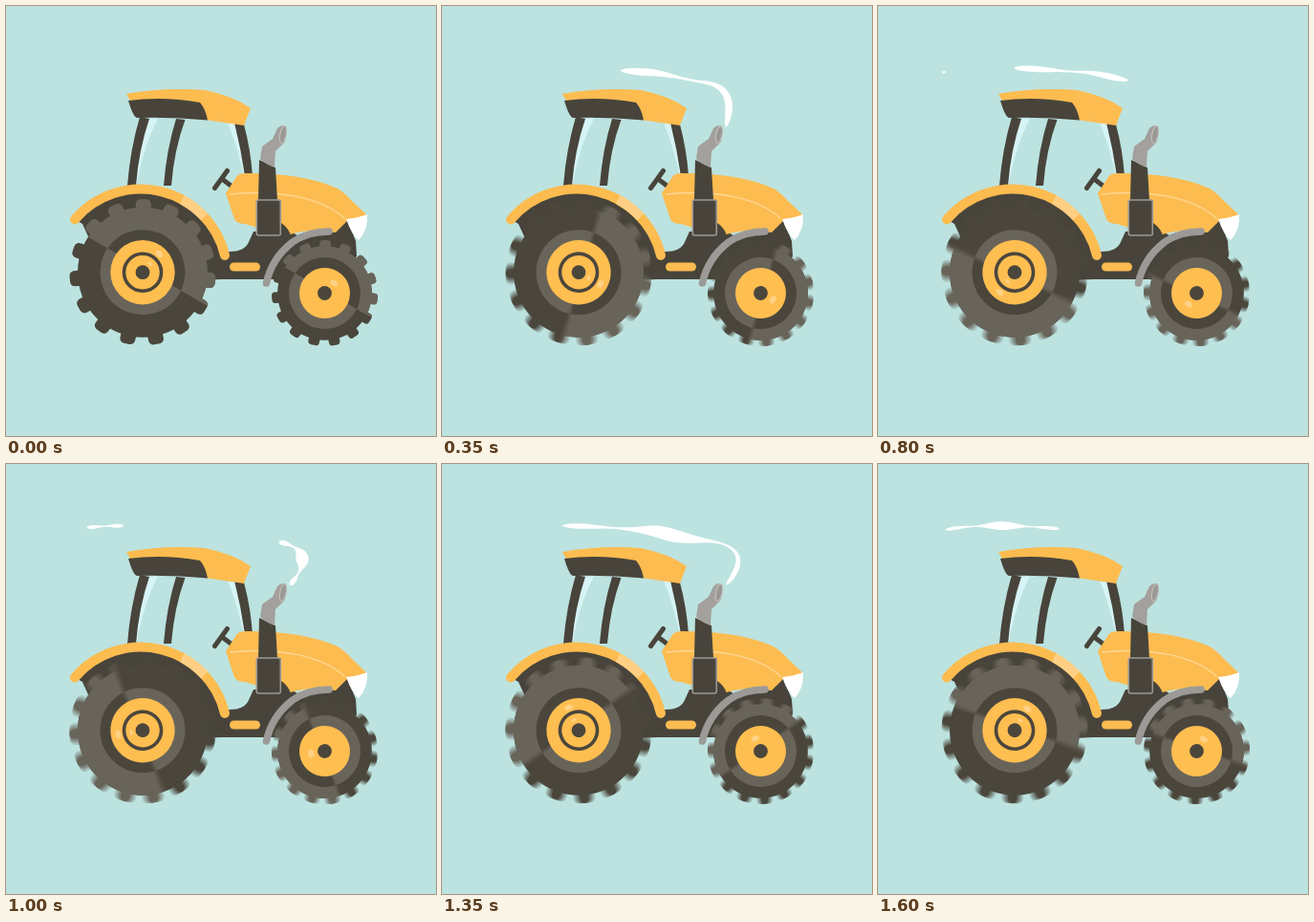
These frames come from a looping animation (450 by 450 pixels, 1650 ms). An HTML page:

```html
<!DOCTYPE html>
<html lang="en">
<head>
<meta charset="utf-8">
<title>Tractor</title>
<style>
  html, body { margin: 0; height: 100%; overflow: hidden; background: #bce3e0; }
  svg { display: block; width: 100vw; height: 100vh; }
  .blur { isolation: isolate; }
  .blur > g { mix-blend-mode: plus-lighter; }
  .dark { fill: #48443b; }
  .light { fill: #686257; }
  .yellow { fill: #fdbc50; }
  .shine { fill: #ffd084; }
  .line { fill: none; stroke-linecap: round; stroke-linejoin: round; }
</style>
</head>
<body>
<svg viewBox="0 0 450 450">
  <g id="smoke" fill="#fff"></g>

  <!-- cab -->
  <path fill="#d6f4f6" d="M148 118H159Q144 146 137 186H134ZM232 122H241L251 178H249Q243 150 232 122Z"/>
  <path class="dark" d="M140 116Q130 150 127 188H136Q139 150 150 118ZM178 118Q168 150 165 188H173Q176 150 187.5 119ZM239 122Q246 150 250 178H258Q256 150 249 124Z"/>
  <path class="yellow" d="M126 92Q165 85 208 88Q238 94 256 107L249 125L208 119L130 99Z"/>
  <path class="dark" d="M128 99Q165 94 203 101Q209 108 211 119.5Q175 116 137 117Q133 116 128 99Z"/>
  <path class="line" stroke="#48443b" stroke-width="5" d="M218.5 190.5L231.5 172.5M226 181L238 190"/>

  <!-- chassis and rear fender -->
  <path class="dark" d="M215 257H234Q250 257 254 247L259 236H298L310 243 345 236 356 221 366 246 367 262 340 300 285 286H215Z"/>
  <path class="dark" d="M80 228L72 223.5A90.5 90.5 0 0 1 229 260L225 286 143 290 90 250Z"/>
  <path class="line" stroke="#fdbc50" stroke-width="10" d="M72 223.5A90.5 90.5 0 0 1 229 261"/>
  <path fill="none" stroke="#ffd084" stroke-width="10" pathLength="100" stroke-dasharray="0 62 15 100" d="M72 223.5A90.5 90.5 0 0 1 229 261"/>
  <rect class="yellow" x="234" y="268.5" width="32" height="9" rx="4.5"/>

  <!-- bonnet and exhaust -->
  <path class="yellow" d="M230 196L241 179Q243 175 252 175Q312 175 347 191Q354 195 362 204L378 219L357 225Q350 232 345 237Q312 232 293 241L250 228Q241 228 239 223Z"/>
  <path class="line" stroke="#ffd793" stroke-width="1.4" d="M235 197C285 192 330 200 354 222"/>
  <path fill="#fff" d="M356 223Q368 222 378 218Q379 235 369 245Q362 240 356 223Z"/>
  <path class="dark" d="M265 161L282 169 284 203H288V227Q296 232 299 243L285 262H255L262 236V203H264Z"/>
  <rect class="line" x="262.3" y="203" width="25" height="37" rx="2" stroke="#9c9894" stroke-width="1.6"/>
  <path fill="#a3a09d" d="M266 160L268 147 279 139 284 128Q289 123 293 126L292 142 282 152 281 169Q272 166 266 160Z"/>
  <ellipse cx="290" cy="134.5" rx="3.2" ry="9" transform="rotate(12 290 134.5)" fill="#9a9794" stroke="#c1bfbc" stroke-width="1.2"/>

  <g id="wheels"></g>
  <path class="line" stroke="#9c9a97" stroke-width="7.5" d="M272.5 290Q278 264 300 247Q316 236 338 236"/>
</svg>
<script>
const LOOP = 1650, STEP = 50, COPIES = 5, SHUTTER = 5.5, TEETH = 15;
const smoke = document.getElementById('smoke');
const wheels = document.getElementById('wheels');

function add(parent, tag, attrs = {}) {
  const el = document.createElementNS('http://www.w3.org/2000/svg', tag);
  for (const name in attrs) el.setAttribute(name, attrs[name]);
  return parent.appendChild(el);
}

function tread(radius) {
  let shapes = '<circle r="68"/>';
  for (let i = 0; i < TEETH; i++)
    shapes += `<rect x="56" y="-8" width="20.5" height="16" rx="5" transform="rotate(${6.7 + i * 360 / TEETH})"/>`;
  return `<g transform="scale(${radius / 76.5})">${shapes}</g>`;
}

function wheelArt({ radius, ring, hub, shine, rim }, id) {
  const shape = tread(radius);
  return `<g class="dark">${shape}</g><circle r="${ring}" class="light"/>
    <g clip-path="url(#half${id})"><g class="light">${shape}</g><circle r="${ring}" class="dark"/></g>
    <circle r="${hub}" class="yellow"/>
    ${rim ? `<circle r="${rim}" fill="none" stroke="#48443b" stroke-width="3.6"/>` : ''}
    <circle r="7.4" class="dark"/>
    <g class="shine" transform="rotate(-48)">
      <ellipse cx="${shine}" rx="3" ry="4.2"/>${rim ? '<ellipse cx="12" rx="1.6" ry="2.8"/>' : ''}
    </g>`;
}

const copies = [];
[
  { x: 143, y: 278.7, radius: 76.5, ring: 44.5, hub: 33.7, shine: 26, rim: 19.5 },
  { x: 333.5, y: 300.5, radius: 55.5, ring: 37.5, hub: 26.5, shine: 14.5 }
].forEach((wheel, id) => {
  const clip = add(wheels, 'clipPath', { id: 'half' + id });
  add(clip, 'rect', { x: wheel.radius / 22, y: -90, width: 90, height: 180, transform: 'rotate(-60)' });
  const place = add(wheels, 'g', { class: 'blur', transform: `translate(${wheel.x} ${wheel.y})` });
  for (let i = 0; i < COPIES; i++) {
    const copy = add(place, 'g', { opacity: 1 / COPIES });
    copy.innerHTML = wheelArt(wheel, id);
    copies.push({ copy, offset: (i / (COPIES - 1) - 0.5) * SHUTTER });
  }
});

// Each puff leaves the pipe at `start`; its tail lets go after `hold` ms.
const puffs = [
  { start: 50, hold: 310, lobes: 1, bend: 303 },
  { start: 390, hold: 320, lobes: 1, bend: 305 },
  { start: 885, hold: 525, lobes: 2, bend: 317 }
];
for (const puff of puffs) {
  const d = `M297 127C${puff.bend} 104 ${puff.bend} 84 275 80S235 70 210 69S110 59 66 70`;
  puff.track = add(smoke, 'path', { d, fill: 'none' });
  puff.length = puff.track.getTotalLength();
  puff.body = add(smoke, 'path');
}

const easeOut = k => Math.sin(Math.PI / 2 * Math.min(1, Math.max(0, k)));

function outline({ start, hold, lobes, track, length }, t) {
  const head = easeOut((t - start) / 800), tail = easeOut((t - start - hold) / 500);
  if (head - tail < 0.005) return '';
  const size = 4 * (1 - 0.6 * tail), left = [], right = [];
  for (let i = 0; i <= 48; i++) {
    const u = i / 48, s = (tail + (head - tail) * u) * length;
    const p = track.getPointAtLength(s);
    const a = track.getPointAtLength(s - 1), b = track.getPointAtLength(s + 1);
    const width = size * Math.sqrt(Math.sin(Math.PI * u)) * (1 + 0.7 * Math.cos(2 * Math.PI * lobes * u));
    const r = (width || 0) / Math.hypot(b.x - a.x, b.y - a.y);
    const dx = (a.y - b.y) * r, dy = (b.x - a.x) * r;
    left.push([p.x + dx, p.y + dy]);
    right.unshift([p.x - dx, p.y - dy]);
  }
  return 'M' + left.concat(right).join('L') + 'Z';
}

function draw() {
  const t = Math.floor(performance.now() % LOOP / STEP) * STEP;
  const angle = t / LOOP * 360;
  for (const { copy, offset } of copies)
    copy.setAttribute('transform', `rotate(${angle + (t ? offset : 0)})`);
  for (const puff of puffs) puff.body.setAttribute('d', outline(puff, t));
  requestAnimationFrame(draw);
}
draw();
</script>
</body>
</html>
```
